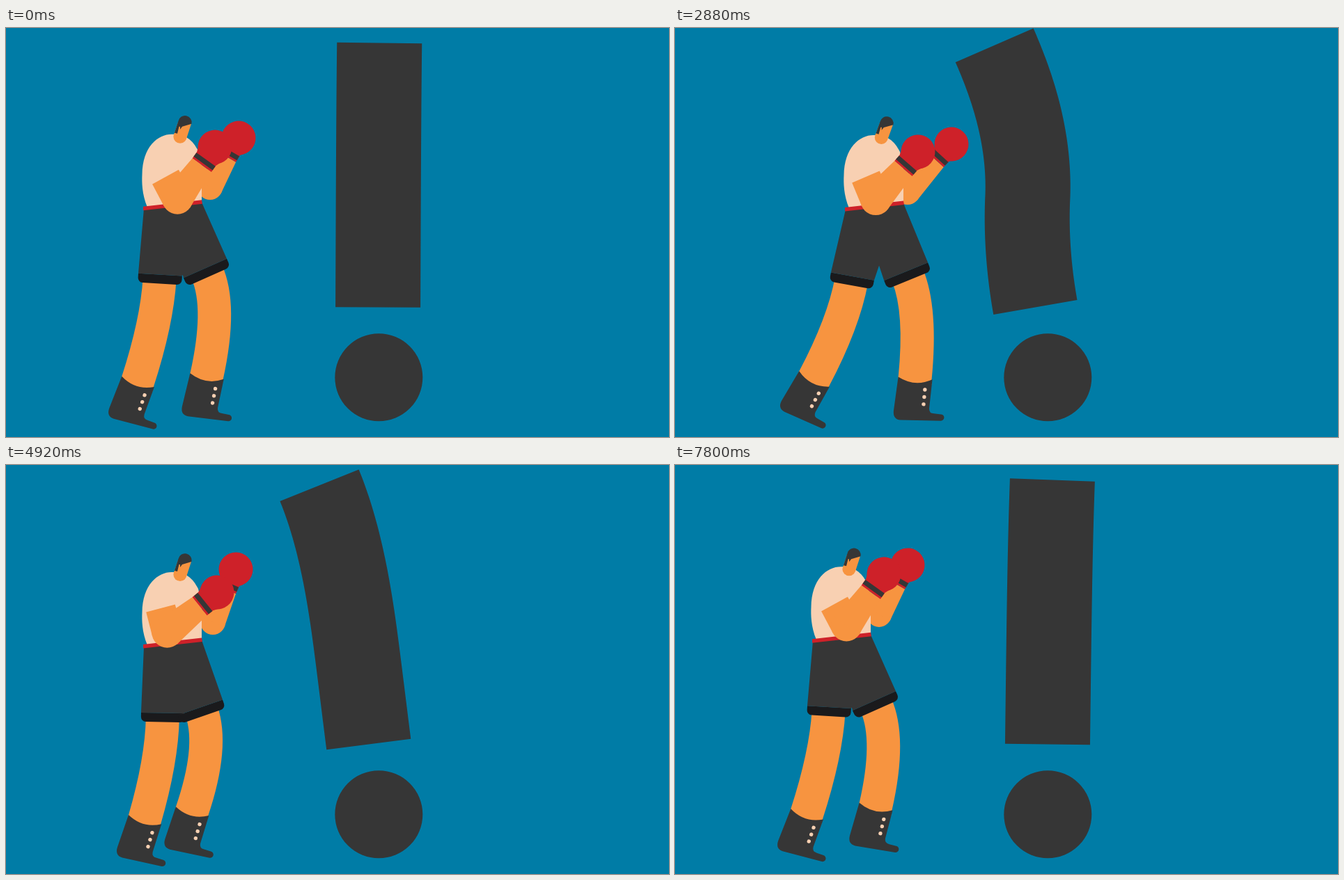
An HTML page with a canvas for the animation above (7840 ms loop, 952x588 px).

```html
<!DOCTYPE html>
<html lang="en">
<head>
<meta charset="utf-8">
<title>Boxer</title>
<style>
html, body { margin: 0; width: 100%; height: 100%; overflow: hidden; background: #007ca6; }
canvas { display: block; width: 100vw; height: 100vh; }
</style>
</head>
<body>
<canvas id="stage" width="952" height="588"></canvas>
<script>
const g = document.getElementById('stage').getContext('2d');
const LOOP = 7840, HOP = LOOP / 20;
const BLUE = '#007ca6', DARK = '#363636', SKIN = '#f79440', SHIRT = '#f8d0b2', RED = '#ce2129', HEM = '#1a1a1c';
const { sin, cos, hypot, atan2, acos, PI, min, max } = Math;
const rad = deg => deg * PI / 180;
const smooth = u => u * u * (3 - 2 * u);
const ramp = (a, b, t) => smooth(min(1, max(0, (t - a) / (b - a))));
const lerp = (a, b, u) => a + (b - a) * u;

// Blends numbers, arrays and objects alike
function mix(a, b, u) {
  if (typeof a === 'number') return lerp(a, b, u);
  const out = Array.isArray(a) ? [] : {};
  for (const k in a) out[k] = mix(a[k], b[k], u);
  return out;
}

// ---- Timing ----

const punches = [440, 2440, 3640, 4380, 5890];

// Points are relative to the body, which the lean carries forward
const guard = { lean: 0, reach: 0, step: 0, nod: 0, bounce: 1,
  shoulder: [229, 217], glove: [300, 174], farElbow: [293, 232], farGlove: [334, 161] };
const feint = { ...guard, nod: 1, bounce: 0,
  shoulder: [230, 211], glove: [298, 161], farElbow: [272, 230], farGlove: [353, 214] };
const ready = { ...guard, lean: .87, bounce: 0,
  shoulder: [227, 214], glove: [302, 178], farElbow: [287, 236], farGlove: [350, 167] };
const hit = { ...ready, lean: 1, reach: 1,
  shoulder: [293, 178], glove: [452, 155], farElbow: [266, 245], farGlove: [311, 202] };
const follow = { ...hit, shoulder: [289, 184], glove: [448, 169] };
const step = { ...guard, step: 1, bounce: 0,
  shoulder: [222, 206], glove: [303, 183], farElbow: [297, 226], farGlove: [330, 150] };

const keys = [
  [0, guard], [920, guard], [1240, feint], [1480, guard], [2120, guard], [2880, ready],
  [4920, step], [5200, guard], [5600, guard], [6420, guard], [LOOP, guard],
  ...punches.flatMap(c => [[c - 120, ready], [c, hit], [c + 110, follow], [c + 260, ready]])
].sort((a, b) => a[0] - b[0]);

function poseAt(t) {
  const i = keys.findIndex(k => k[0] > t);
  const [t0, from] = keys[i - 1], [t1, to] = keys[i];
  return mix(from, to, smooth((t - t0) / (t1 - t0)));
}

// Time since the latest punch, counted from `lead` ms ahead of contact
const since = (t, lead) => min(...punches.map(c => (t - c + lead + LOOP) % LOOP)) - lead;

// The mark is bent by the glove, springs back, then swings and dies down
function markAt(t) {
  const free = since(t, 0), age = since(t, 70);
  const swing = 2.45 * Math.exp(-free / 890) * sin(PI * (free - 400) / 785);
  const pushed = {
    sway: -4.5 - 7.5 * cos(2 * PI * age / 420),
    curl: 17 * ramp(210, 440, age),
    hook: 1 - .74 * ramp(210, 420, age)
  };
  const grip = ramp(-70, 0, age) * (1 - ramp(400, 560, age));
  return mix({ sway: -10.4 * swing, curl: -21 * swing, hook: 0 }, pushed, grip);
}

// ---- Drawing helpers ----

function poly(color, ...p) {
  g.fillStyle = color;
  g.beginPath();
  for (let i = 0; i < p.length; i += 2) g.lineTo(p[i], p[i + 1]);
  g.fill();
}

function disc(color, x, y, r) {
  g.fillStyle = color;
  g.beginPath();
  g.arc(x, y, r, 0, 7);
  g.fill();
}

function shape(color, path) {
  g.fillStyle = color;
  g.fill(new Path2D(path));
}

function at(x, y, angle, draw) {
  g.save();
  g.translate(x, y);
  g.rotate(angle);
  draw();
  g.restore();
}

// ---- Mark ----

// Heading along the spine: one arc to the right, then a tighter one to the left
function mark({ sway, curl, hook }) {
  const n = 80, knee = .41, size = 380 + hook * hook * (122 + 2.5 * sway);
  let x = 533.7 + 1.8 * sway + 9 * hook, y = 401.5;
  g.strokeStyle = DARK;
  g.lineWidth = 122;
  g.beginPath();
  g.moveTo(x, y);
  for (let i = 0; i < n; i++) {
    const s = (i + .5) / n;
    const a = rad(sway + curl * s ** 3 + hook * (132 * min(s, knee) - 302 * max(0, s - knee)));
    x += sin(a) * size / n;
    y -= cos(a) * size / n;
    g.lineTo(x, y);
  }
  g.stroke();
  disc(DARK, 535.3, 502.3, 63);
}

// ---- Boxer ----

function taper(x1, y1, r1, x2, y2, r2) {
  const a = atan2(y2 - y1, x2 - x1), c = cos(a), s = sin(a);
  poly(SKIN, x1 - s * r1, y1 + c * r1, x2 - s * r2, y2 + c * r2,
    x2 + s * r2, y2 - c * r2, x1 + s * r1, y1 - c * r1);
}

function forearm([ex, ey], r, [gx, gy], half, hand) {
  const a = atan2(gy - ey, gx - ex);
  const wx = gx - hand * cos(a), wy = gy - hand * sin(a);
  disc(SKIN, ex, ey, r);
  taper(ex, ey, r, wx, wy, half);
  at(wx, wy, a, () => {
    poly(RED, 0, -half, 11, -half, 27, -23, 27, 23, 11, half, 0, half);
    disc(RED, hand, 0, 24.5);
    g.fillStyle = DARK;
    g.fillRect(3, -half, 7, 2 * half);
  });
}

// The elbow hangs below the line from shoulder to glove, and the arm stretches when straight
function nearArm([sx, sy], glove, reach) {
  const d = hypot(glove[0] - sx, glove[1] - sy), stretch = max(1, d / 128);
  const upper = 36 * stretch, fore = 92 * stretch;
  const bend = acos(min(1, (upper ** 2 + d ** 2 - fore ** 2) / (2 * upper * d)));
  const a = atan2(glove[1] - sy, glove[0] - sx) + bend;
  const elbow = [sx + upper * cos(a), sy + upper * sin(a)], r = 22 - 3 * reach;
  taper(sx, sy, 21.5, ...elbow, r);
  forearm(elbow, r, glove, 16.8, 32 + 4 * reach);
}

function leg([hx, hy], hemAngle, [x, y, tilt], bend) {
  const a = rad(hemAngle), b = rad(tilt);
  g.strokeStyle = SKIN;
  g.lineWidth = 48;
  g.beginPath();
  g.moveTo(hx, hy);
  g.quadraticCurveTo(hx - bend * sin(a), hy + bend * cos(a), x, y);
  g.lineTo(x - 9 * sin(b), y + 9 * cos(b));
  g.stroke();
  at(x, y, b, () => {
    shape(DARK, 'M-24-2Q0 13 25 1L21 43Q21 50 28 50L38 51A4.6 4.6 0 0 1 38 60.3L-20 60Q-31 59-30 47Z');
    for (let i = 0; i < 3; i++) disc(SHIRT, 14.5 - i * .8, 16 + i * 10.4, 2.7);
  });
}

function head(x, y, angle) {
  at(x, y, rad(angle), () => {
    poly(SKIN, -9, 0, 10, 2, 3.5, 22, -15, 18);
    disc(SKIN, -6, 20.5, 9.6);
    shape(DARK, 'M-8.5-2A9.7 9.7 0 0 1 10.5 2L-3 6L-6 10L-6 6L-7.5 6L-10 16L-14 15Z');
  });
}

function shirt(x, y, reach, [sx, sy]) {
  const to = (a, b, c, d) => [x + lerp(a, c, reach), y + lerp(b, d, reach)];
  g.fillStyle = SHIRT;
  g.beginPath();
  g.moveTo(x + 203, y + 259);
  g.bezierCurveTo(x + 195, y + 240, x + 195, y + 222, x + 195.5, y + 212);
  g.bezierCurveTo(...to(196, 172, 197, 180), ...to(218, 154, 226, 160), ...to(238, 154, 254, 159));
  g.bezierCurveTo(...to(258, 154, 266, 157), ...to(268, 162, 276, 157),
    lerp(x + 276, sx - 4, reach), lerp(y + 178, sy - 21, reach));
  g.lineTo(lerp(x + 281, sx + 4, reach), lerp(y + 200, sy + 21, reach));
  g.lineTo(x + 281, y + 204);
  g.lineTo(x + 281, y + 254);
  g.fill();
}

function hem([x, y], angle, from, width) {
  at(x, y, rad(angle), () => {
    g.fillStyle = HEM;
    g.beginPath();
    g.roundRect(from, 0, width, 13, [0, 0, 7, 7]);
    g.fill();
  });
}

function boxer(p, t) {
  const { lean, reach, step, nod } = p, x = 54 * lean, u = t % HOP / HOP;
  const lift = 13 * p.bounce * Math.sqrt(4 * u * (1 - u));
  const place = ([px, py]) => [px + x, py - 2.2 * lift];
  const along = ([px, py], deg, d, v) => {
    const c = cos(rad(deg)), s = sin(rad(deg));
    return [px + c * d - s * v, py + s * d + c * v];
  };

  const back = [189 + 12 * lean + 10 * step, 510 - 6 * lean - lift, 14.5 + 10.5 * lean - 2.5 * step];
  const front = [288 + 65 * lean - 21 * step, 503 + lean - 5 * step - 1.5 * lift,
    6 - 6 * lean + 5.5 * step + .4 * lift];
  const left = [190 + 39 * lean + 4 * step, 354 - 3 * lean + 2 * step - lift];
  const right = [317 + 53 * lean - 6 * step, 333 + 5 * lean + 4.5 * step - lift];
  const leftTilt = 3.4 + 8 * lean - 2.4 * step, rightTilt = 2 * lean + 5 * step - 24;
  const inLeft = along(left, leftTilt, 63, 0), inRight = along(right, rightTilt, -68, 0);
  const gap = max(0, inRight[0] - inLeft[0]);
  const shoulder = place(p.shoulder);

  forearm(place(p.farElbow), 18, place(p.farGlove), 14, 32);
  leg(along(left, leftTilt, 31, 6), leftTilt, back, 62);
  leg(along(right, rightTilt, -34, 6), rightTilt, front, 54);

  const face = () => head(256 + x + 7 * reach - 8 * nod, 137 + 4 * reach + 5 * nod - lift, 2 * lean + 9 * reach);
  if (reach > .5) face();
  shirt(x, -lift, reach, shoulder);
  if (reach <= .5) face();

  hem(left, leftTilt, 0, 63);
  hem(right, rightTilt, -68, 68);
  poly(DARK, 198 + x, 261 - lift, ...left, ...inLeft,
    (inLeft[0] + inRight[0]) / 2, (inLeft[1] + inRight[1]) / 2 - 1.5 * gap,
    ...inRight, ...right, 281 + x, 252 - lift);
  poly(RED, 197 + x, 258 - lift, 281 + x, 248.5 - lift, 282 + x, 254 - lift, 197 + x, 263.5 - lift);

  nearArm(shoulder, place(p.glove), reach);
}

function frame() {
  const t = performance.now() % LOOP;
  g.fillStyle = BLUE;
  g.fillRect(0, 0, 952, 588);
  mark(markAt(t));
  boxer(poseAt(t), t);
  requestAnimationFrame(frame);
}
frame();
</script>
</body>
</html>
```
